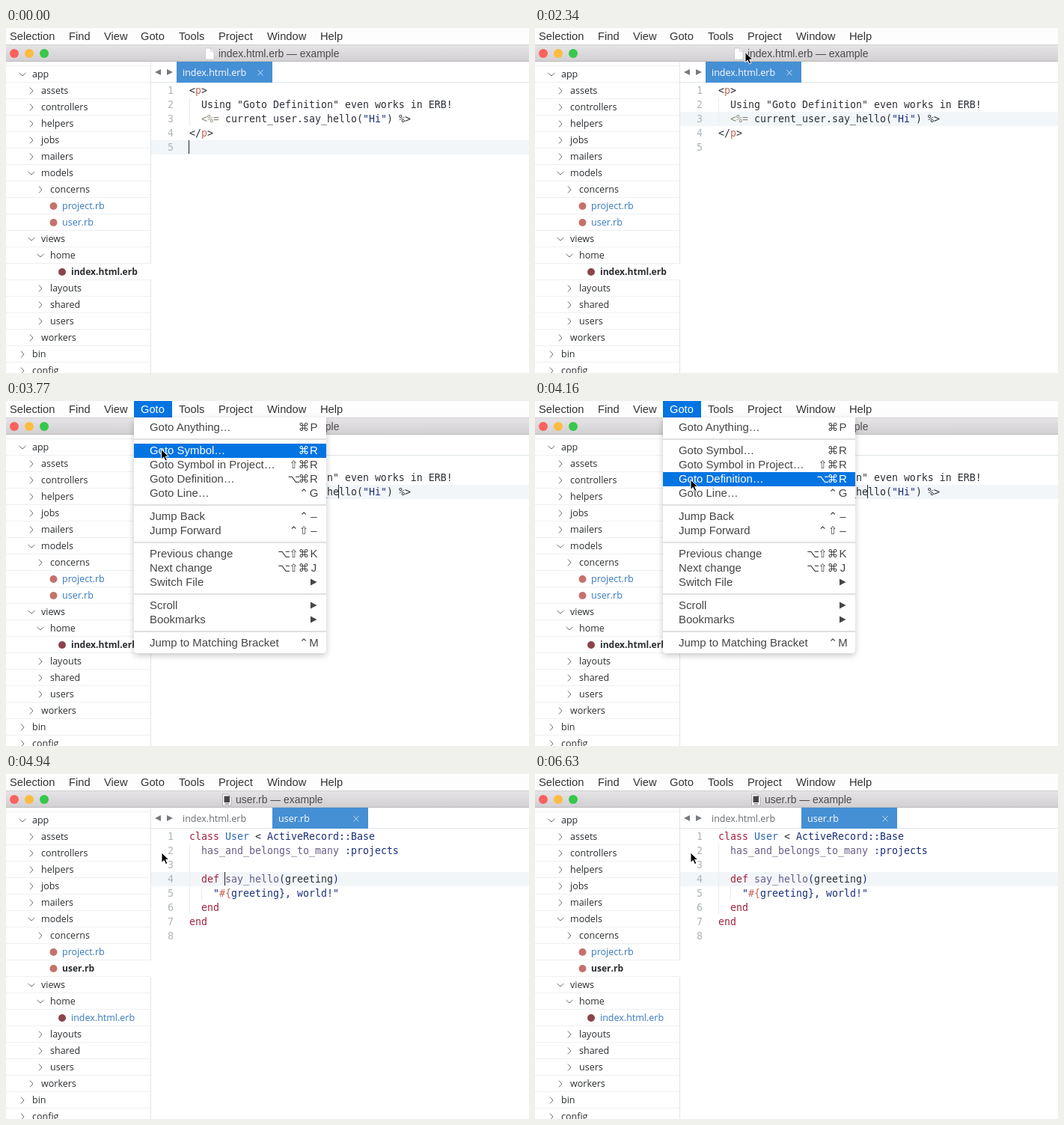
Recreate the animation shown at these times as an HTML page. Size 699 by 461 pixels, loop 8760 ms.

```html
<!DOCTYPE html>
<html lang="en">
<head>
<meta charset="utf-8">
<title>Goto Definition</title>
<style>
  html, body { margin: 0; width: 100%; height: 100%; overflow: hidden; background: #fff; }
  svg { display: block; width: 100vw; height: 100vh; }
  text { white-space: pre; }
  .ui { font: 14.7px "Liberation Sans", Arial, sans-serif; fill: #333; }
  .item { font: 14.95px "Liberation Sans", Arial, sans-serif; fill: #454545; }
  .title { font: 13.9px "Liberation Sans", Arial, sans-serif; fill: #4c4a4c; }
  .side { font: 12.5px "Open Sans", "Noto Sans", sans-serif; fill: #2a2d30; }
  .code { font: 13.29px "DejaVu Sans Mono", monospace; fill: #2c3036; }
  .key { font: 14.5px "DejaVu Sans", sans-serif; }
</style>
</head>
<body>
<svg id="stage" viewBox="0 0 699 461" preserveAspectRatio="none"></svg>
<script>
const LOOP = 8760, STEP = 130, LAST = 6630;
const BLUE = '#0474e2', TAB = '#458fd4';
const LINE = y => 74 + (y - 1) * 19 - (y > 1 ? 0 : 1);

const esc = s => s.replace(/&/g, '&amp;').replace(/</g, '&lt;');
const text = (x, y, s, cls, extra = '') => `<text x="${x}" y="${y}" class="${cls}" ${extra}>${esc(s)}</text>`;
const rect = (x, y, w, h, fill, extra = '') => `<rect x="${x}" y="${y}" width="${w}" height="${h}" fill="${fill}" ${extra}/>`;
const path = (d, extra) => `<path d="${d}" ${extra}/>`;
const dot = (x, y, r, fill) => `<circle cx="${x}" cy="${y}" r="${r}" fill="${fill}"/>`;
const stroke = (c, w) => `fill="none" stroke="${c}" stroke-width="${w}"`;

// Top bar
const MENUS = [['Selection', 5], ['Find', 84], ['View', 131], ['Goto', 180], ['Tools', 231],
  ['Project', 284], ['Window', 349], ['Help', 420]];

function menuBar(active) {
  return rect(0, 0, 699, 22, '#fdfdfd') +
    (active ? rect(171, 0, 51, 22, BLUE) : '') +
    MENUS.map(([s, x]) => text(x, 16, s, 'ui', active && s === 'Goto' ? 'style="fill:#fff"' : '')).join('');
}

function page(x, dark) {
  return path(`M${x} 27h7l4.500 4.500v10.500h-11.500z`, `fill="#fff" stroke="${dark ? '#999' : '#c4c2c4'}" stroke-width=".7"`) +
    (dark ? rect(x + 2, 29.5, 7.5, 8.5, '#454547') + rect(x + 3, 39, 5.5, 1.5, '#8a8a8c')
          : path(`M${x + 7} 27v4.500h4.500`, stroke('#c4c2c4', .7)));
}

function titleBar(user) {
  return rect(0, 22, 699, 23, 'url(#bar)') + rect(0, 22, 699, 1, '#d2d0d2') + rect(0, 44, 699, 1, '#bcbabc') +
    dot(11, 34, 6, '#fc625d') + dot(51, 34, 6, '#35c84a') + dot(31, 34, 6, '#fdbc40') +
    (user ? page(289.5, true) + text(307, 39, 'user.rb — example', 'title')
          : page(266.5, false) + text(284, 39, 'index.html.erb — example', 'title'));
}

// Sidebar rows: depth, name, kind (o open, c closed, r ruby file, e template)
const TREE = [[0, 'app', 'o'], [1, 'assets', 'c'], [1, 'controllers', 'c'], [1, 'helpers', 'c'], [1, 'jobs', 'c'],
  [1, 'mailers', 'c'], [1, 'models', 'o'], [2, 'concerns', 'c'], [2, 'project.rb', 'r'], [2, 'user.rb', 'r'],
  [1, 'views', 'o'], [2, 'home', 'o'], [3, 'index.html.erb', 'e'], [2, 'layouts', 'c'], [2, 'shared', 'c'],
  [2, 'users', 'c'], [1, 'workers', 'c'], [0, 'bin', 'c'], [0, 'config', 'c']];

function sidebar(selected) {
  let out = rect(0, 45, 194, 416, '#fff') + rect(193, 45, 1, 416, '#e1e5e8') + rect(0, 50, 193, 1, '#edf0f2');
  TREE.forEach(([depth, name, kind], i) => {
    const y = 62 + i * 22, x = 22 + depth * 12, on = name === selected;
    const isFile = kind === 'r' || kind === 'e';
    out += rect(0, y + 10, 193, 1, '#edf0f2');
    if (on) out += rect(193, y - 11, 1, 22, '#fff');
    if (kind === 'o') out += path(`M${x - 4.5} ${y - 2}l4.500 4l4.500 -4`, stroke('#6a6e72', 1));
    if (kind === 'c') out += path(`M${x - 2} ${y - 4.5}l4 4.500l-4 4.500`, stroke('#6a6e72', 1));
    if (kind === 'r') out += dot(63.5, y, 5, '#c3736b');
    if (kind === 'e') out += dot(75, y, 5, '#8c444c');
    out += text(x + (isFile ? 29 : 13), y + 4.3, name, 'side',
      on ? 'style="font-weight:700;font-size:12.05px"' : isFile ? 'style="fill:#3579bd"' : '');
  });
  return out;
}

// Editor
const INK = '#2c3036', RED = '#a3213f', NAVY = '#1b2f7c', VIOLET = '#695d86', TAG = '#c2665a', DIM = '#8f8878';
const PAGE = [
  [['<', INK], ['p', TAG], ['>', INK]],
  [['  Using "Goto Definition" even works in ERB!', INK]],
  [['  ', INK], ['<%=', DIM], [' current_user.say_hello(', INK], ['"Hi"', NAVY], [') %>', INK]],
  [['</', INK], ['p', TAG], ['>', INK]],
  []
];
const MODEL = [
  [['class', RED], [' User', '#2b66b5'], [' < ', INK], ['ActiveRecord::Base', NAVY]],
  [['  has_and_belongs_to_many ', VIOLET], [':projects', NAVY]],
  [],
  [['  def ', RED], ['say_hello', VIOLET], ['(', NAVY], ['greeting', INK], [')', NAVY]],
  [['    "', NAVY], ['#{', TAG], ['greeting}, world!"', NAVY]],
  [['  end', RED]],
  [['end', RED]],
  []
];

function tabs(user) {
  const tab = (x, name, on) => (on ? rect(x, 45, 128, 28, TAB) +
      path(`M${x + 108.5} 56l7 7.500m0 -7.500l-7 7.500`, stroke('#c4def5', 1)) : '') +
    text(x + 8, 64, name, 'side', `style="fill:${on ? '#fff' : '#666b70'}"`);
  return rect(194, 45, 505, 28, '#fff') + rect(194, 72, 505, 1, '#dfe4e8') +
    path('M207 55v8l-8 -4zM215 55v8l8 -4z', 'fill="#767a7f"') +
    tab(228, 'index.html.erb', !user) + (user ? tab(356, 'user.rb', true) : '');
}

function editor(lines, row, col, caretOn) {
  let out = rect(194, 73, 505, 388, '#fff') + rect(194, LINE(row), 505, 19, '#f2f6f9');
  const guide = (x, from, to) => rect(x, LINE(from), 1, (to - from + 1) * 19, '#e9edf0');
  out += lines === PAGE ? guide(245, 2, 3) : guide(245, 2, 6) + guide(261, 5, 5);
  lines.forEach((parts, i) => {
    const y = 88 + i * 19;
    out += text(224, y, String(i + 1), 'code', 'text-anchor="end" style="fill:#adb5bc"');
    out += `<text x="245" y="${y}" class="code">` +
      parts.map(([s, c]) => `<tspan style="fill:${c}">${esc(s)}</tspan>`).join('') + '</text>';
  });
  if (caretOn) out += rect(244 + col * 8, LINE(row), 1, 18, '#222');
  return out;
}

// Dropdown: y, label, shortcut ('>' is a submenu)
const ITEMS = [[35, 'Goto Anything…', '⌘P'], [66, 'Goto Symbol…', '⌘R'], [85, 'Goto Symbol in Project…', '⇧⌘R'],
  [104, 'Goto Definition…', '⌥⌘R'], [123, 'Goto Line…', '⌃G'], [154, 'Jump Back', '⌃–'], [173, 'Jump Forward', '⌃⇧–'],
  [204, 'Previous change', '⌥⇧⌘K'], [223, 'Next change', '⌥⇧⌘J'], [242, 'Switch File', '>'],
  [273, 'Scroll', '>'], [292, 'Bookmarks', '>'], [323, 'Jump to Matching Bracket', '⌃M']];

function dropdown(hoverY, opacity) {
  let out = path('M171 22h257v310q0 5 -5 5h-247q-5 0 -5 -5z', 'fill="#fff" filter="url(#shadow)"');
  for (const y of [50, 138, 188, 257, 307]) out += rect(171, y, 257, 2, '#e0e0e0');
  for (const [y, label, keys] of ITEMS) {
    const on = Math.abs(hoverY - y) < 9.5, style = on ? 'style="fill:#fff"' : '';
    if (on) out += rect(171, y - 9, 257, 19, BLUE);
    out += text(192, y + 5, label, 'item', style);
    if (keys === '>') {
      out += path(`M407 ${y - 4.5}v9l8.500 -4.500z`, 'fill="#454545"');
      continue;
    }
    [...keys].reverse().forEach((k, i) => {
      out += text(411.5 - i * 13.4, y + 5, k, i ? 'item key' : 'item', `text-anchor="middle" ${style}`);
    });
  }
  return `<g opacity="${opacity}">${out}</g>`;
}

// Pointer waypoints: time, x, y
const TRACK = [[390, 568, 446], [1170, 445, 121], [1690, 445, 121], [2340, 281, 32.5], [2600, 207, 6],
  [3250, 207, 6], [3770, 207.5, 64.5], [4160, 208, 105]];

function pointerAt(t) {
  const next = TRACK.findIndex(p => p[0] > t);
  if (next < 0) return TRACK[TRACK.length - 1].slice(1);
  if (next === 0) return null;
  const [t0, x0, y0] = TRACK[next - 1], [t1, x1, y1] = TRACK[next], k = (t - t0) / (t1 - t0);
  return [x0 + (x1 - x0) * k, y0 + (y1 - y0) * k];
}

function pointer([x, y]) {
  if (x > 230 && y > 73) {
    const beam = 'M-3 -8q3 0 3 2q0 -2 3 -2M0 -6v12M-3 8q3 0 3 -2q0 2 3 2';
    return `<g transform="translate(${x} ${y})">${path(beam, stroke('#fff', 2.6))}${path(beam, stroke('#222', 1.1))}</g>`;
  }
  return path('M0 0v13.500l3.200 -3l2.300 5l2.400 -1l-2.300 -4.900h4.200z',
    `transform="translate(${x} ${y})" fill="#000" stroke="#fff" stroke-width="1"`);
}

const DEFS = `<defs>
  <linearGradient id="bar" x2="0" y2="1"><stop stop-color="#e6e4e6"/><stop offset="1" stop-color="#d1cfd1"/></linearGradient>
  <filter id="shadow" x="-10%" y="-10%" width="120%" height="120%"><feDropShadow dx="0" dy="3" stdDeviation="4" flood-opacity=".22"/></filter>
</defs>`;

const CLICK = 1430, OPEN = 2730, PICK = 4420, FADE = 4550, CLOSE = 4810, JUMP = 4940, BLINK = 520;

function caretVisible(t) {
  if (t >= OPEN && t < JUMP) return true;
  if (t < CLICK) return t < 130 || (t >= 650 && t < 1170);
  return Math.floor((t - (t < JUMP ? CLICK : JUMP)) / BLINK) % 2 === 0;
}

function draw(t) {
  const user = t >= JUMP, menu = t >= OPEN && t < CLOSE;
  const mouse = pointerAt(t), caret = caretVisible(t);
  let out = DEFS;
  out += user ? editor(MODEL, 4, 6, caret) : t < CLICK ? editor(PAGE, 5, 0, caret) : editor(PAGE, 3, 25, caret);
  out += tabs(user) + sidebar(user ? 'user.rb' : 'index.html.erb') + titleBar(user) + menuBar(menu);
  if (menu) {
    const hidden = (t >= PICK && t < FADE) || t > FADE;
    const opacity = Math.min(1, Math.max(0, 1 - (t - FADE) / 150));
    out += dropdown(hidden ? -99 : mouse[1], opacity);
  }
  if (mouse) out += pointer(mouse);
  return out;
}

const stage = document.getElementById('stage');
const start = performance.now();
let shown = -1;

function tick() {
  const t = (performance.now() - start) % LOOP;
  const step = Math.min(LAST, Math.floor(t / STEP) * STEP);
  if (step !== shown) stage.innerHTML = draw(shown = step);
  requestAnimationFrame(tick);
}
tick();
</script>
</body>
</html>
```
